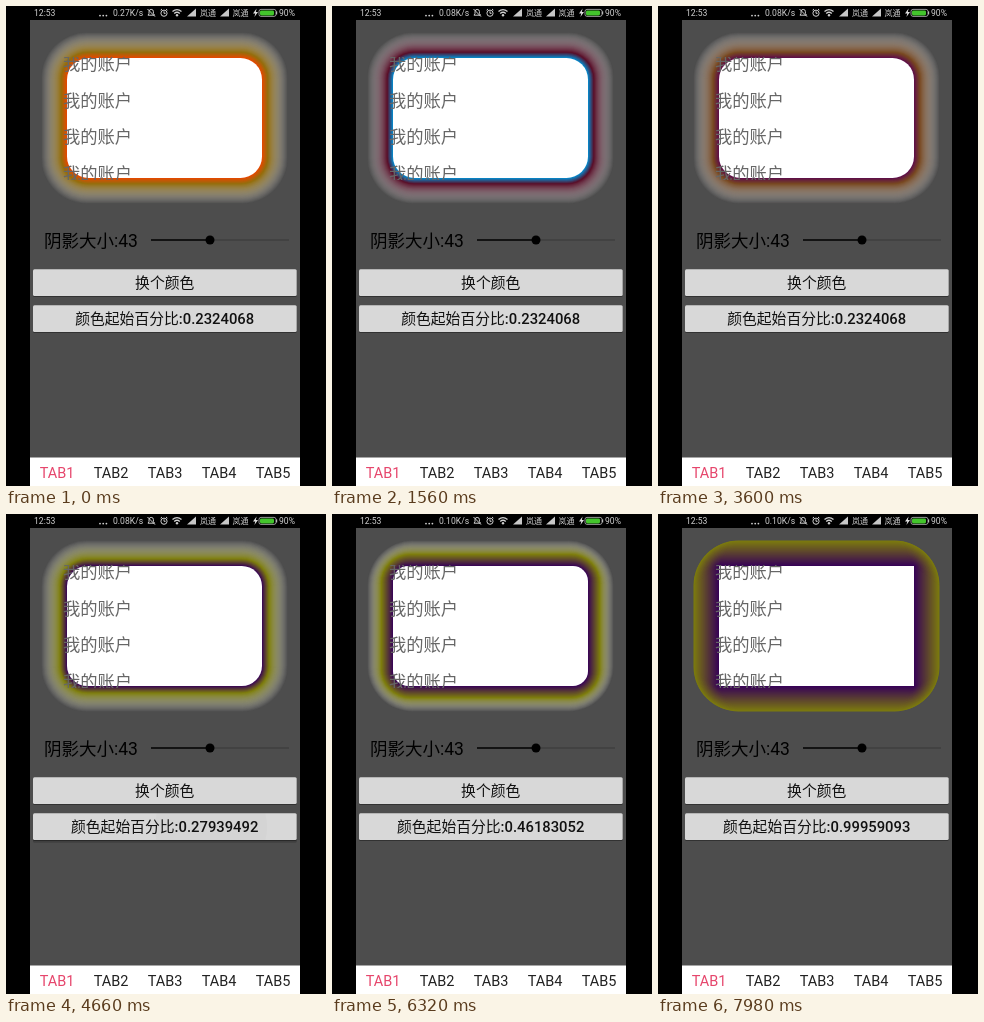
Write an HTML page that moves like this. It is 320 px wide and 480 px high and loops after 8000 ms.

```html
<!DOCTYPE html>
<html lang="zh-CN">
<head>
<meta charset="utf-8">
<style>
html, body { margin: 0; width: 100%; height: 100%; overflow: hidden; background: #000; }
svg { display: block; width: 320px; height: 480px; }
text { font-family: Roboto, "Noto Sans CJK SC", "Noto Sans CJK", sans-serif; }
.status text { font-size: 8.6px; fill: #d0d0d0; }
.list text { font-size: 17.3px; fill: #666; }
.btn text { font-size: 14.8px; text-anchor: middle; fill: #111; }
.num { font-weight: 500; }
.tabs text { font-size: 14.5px; text-anchor: middle; fill: #222; }
.tabs text:first-of-type { fill: #e6466c; }
</style>
</head>
<body>
<svg viewBox="0 0 320 480">
  <defs>
    <clipPath id="listClip"><rect x="50" y="51" width="210" height="123"/></clipPath>
    <clipPath id="clip0"><rect x="27" y="263.3" width="263.7" height="26.7" rx="1.5"/></clipPath>
    <clipPath id="clip1"><rect x="27" y="299.3" width="263.7" height="26.7" rx="1.5"/></clipPath>
    <path id="signal" d="M0 10.5L9 2.5V10.5Z" fill="#c8c8c8"/>
  </defs>
  <rect width="320" height="480"/>
  <rect x="24" y="14" width="270" height="438" fill="#4d4d4d"/>

  <g class="status">
    <text x="28" y="10">12:53</text>
    <g fill="#d0d0d0"><circle cx="94" cy="9.6" r=".9"/><circle cx="97.2" cy="9.6" r=".9"/><circle cx="100.4" cy="9.6" r=".9"/></g>
    <text id="speed" x="107" y="10"></text>
    <g fill="none" stroke="#d0d0d0">
      <path d="M142 9.2H148.5L147.4 7.5V5.6A2.2 2.2 0 0 0 143 5.6V7.5ZM141.5 3L149 10.6"/>
      <circle cx="158" cy="7.2" r="3.1"/><path d="M158 5.3V7.3H159.6M154.6 4.2L156 3M161.4 4.2L160 3"/>
      <path d="M166.5 5.6Q171 1.6 175.5 5.6M168.2 7.5Q171 5 173.8 7.5" stroke-width="1.3"/>
    </g>
    <circle cx="171" cy="9.2" r="1.2" fill="#d0d0d0"/>
    <use href="#signal" x="181"/>
    <text x="194" y="10" style="font-size:8px">岚通</text>
    <use href="#signal" x="214"/>
    <text x="226.5" y="10" style="font-size:8px">岚通</text>
    <path d="M250.6 2.5L247 7.6H249.3L248.4 11L252 6H249.8Z" fill="#e0e0e0"/>
    <rect x="253" y="3.4" width="17" height="7" rx="2" stroke="#bbb" stroke-width=".8"/>
    <rect x="254" y="4.4" width="14" height="5" rx="1.4" fill="#43c52c"/>
    <rect x="270" y="5.4" width="1.2" height="3" fill="#bbb"/>
    <text x="273" y="10">90%</text>
  </g>

  <g id="glow"></g>
  <rect id="card" x="61" y="52" width="195" height="120" fill="#fff"/>
  <g class="list" clip-path="url(#listClip)">
    <text x="57" y="64">我的账户</text><text x="57" y="100.5">我的账户</text>
    <text x="57" y="137">我的账户</text><text x="57" y="173.5">我的账户</text>
  </g>

  <text x="38" y="240.5" font-size="17.5">阴影大小:43</text>
  <path d="M204 234H283" stroke="#383838" stroke-width="1.2"/>
  <path d="M145 234H204" stroke="#000" stroke-width="1.5"/>
  <circle cx="204" cy="234" r="4.5"/>

  <g id="buttons"></g>

  <g class="tabs">
    <rect x="24" y="451.5" width="270" height="28.5" fill="#fff"/>
    <text x="51" y="472">TAB1</text><text x="105" y="472">TAB2</text><text x="159" y="472">TAB3</text>
    <text x="213" y="472">TAB4</text><text x="267" y="472">TAB5</text>
  </g>
</svg>
<script>
const LOOP = 8000, SPREAD = 26, STEPS = 52, HOLD = 80, FADE = 480;
const BACK = [77, 77, 77], WHITE = [255, 255, 255];

// press time, inner colour, middle colour
const colors = [
  [-500, [235, 70, 0], [148, 110, 12]],
  [20, [118, 105, 108], [116, 60, 24]],
  [920, [0, 146, 216], [90, 14, 40]],
  [1560, [62, 80, 136], [102, 17, 44]],
  [2180, [124, 20, 58], [116, 22, 52]],
  [2900, [92, 10, 76], [120, 72, 32]],
  [3620, [54, 0, 88], [126, 126, 12]]
];
// press time, start share as printed
const shares = [
  [-500, "0.2324068"], [4580, "0.27939492"], [5220, "0.042865574"], [5700, "0.46183052"],
  [6320, "0.5217364"], [6960, "0.879266"], [7480, "0.99959093"]
];

const $ = id => document.getElementById(id);
function add(parent, tag, attrs) {
  const el = document.createElementNS("http://www.w3.org/2000/svg", tag);
  set(el, attrs);
  parent.appendChild(el);
  return el;
}
function set(el, attrs) {
  for (const k in attrs) el.setAttribute(k, attrs[k]);
}
const lerp = (a, b, u) => a + (b - a) * u;
const mix = (a, b, u) => a.map((v, i) => lerp(v, b[i], u));
const clamp = v => Math.max(0, Math.min(1, v));
const lastAt = (list, t) => list.filter(e => e[0] <= t).pop();

const rings = [];
for (let i = STEPS; i >= 0; i--) {
  const d = SPREAD * i / STEPS;
  const el = add($("glow"), "rect", { x: 61 - d, y: 52 - d, width: 195 + 2 * d, height: 120 + 2 * d });
  rings.push({ el, u: i / STEPS });
}

function makeButton(i, y) {
  const g = add($("buttons"), "g", { class: "btn" });
  const box = { x: 27, width: 263.7, height: 26.7, rx: 1.5 };
  const lift = add(g, "rect", { ...box, y: y + 3, fill: "#000" });
  add(g, "rect", { ...box, y: y + 1.2, fill: "#000", opacity: .35 });
  add(g, "rect", { ...box, y: y + .3, fill: "#d8d8d8" });
  const wave = add(g, "circle", { cx: 205, cy: y + 14, fill: "#000", "clip-path": `url(#clip${i})` });
  const label = add(g, "text", { x: 158.7, y: y + 19.2 });
  return { lift, wave, label };
}
const buttons = [makeButton(0, 263), makeButton(1, 299)];
buttons[0].label.textContent = "换个颜色";
buttons[1].label.textContent = "颜色起始百分比";
const num = add(buttons[1].label, "tspan", { class: "num" });

function press(button, age) {
  const grow = 1 - (1 - clamp((age - 40) / 300)) ** 2;
  const fade = 1 - clamp((age - 220) / (FADE - 220));
  set(button.wave, { r: lerp(12, 185, grow), opacity: .11 * fade * clamp((age - 60) / 120) });
  set(button.lift, { opacity: .22 * fade * clamp(age / 100) });
}

// the middle colour fades to transparent white over the backdrop
const fadeOut = (mid, v) => mix(BACK, mix(mid, WHITE, v), 1 - v);

let shown = "";
function paintGlow(inner, mid, text) {
  const key = inner + text;
  if (key === shown) return;
  shown = key;
  const p = +text, r = 28 * (1 - p);
  for (const { el, u } of rings) {
    const c = u < p ? mix(inner, mid, u / p) : fadeOut(mid, (u - p) / (1 - p));
    set(el, { rx: lerp(r, 46, u), fill: `rgb(${c.map(Math.round)})` });
  }
  set($("card"), { rx: r });
  num.textContent = ":" + text;
}

function draw(t) {
  const [, inner, mid] = lastAt(colors, t - HOLD);
  paintGlow(inner, mid, lastAt(shares, t - HOLD)[1]);
  press(buttons[0], t - lastAt(colors, t)[0]);
  press(buttons[1], t - lastAt(shares, t)[0]);
  $("speed").textContent = (t < 240 ? "0.27" : t < 4800 ? "0.08" : "0.10") + "K/s";
}

const start = performance.now();
function tick() {
  draw((performance.now() - start) % LOOP);
  requestAnimationFrame(tick);
}
tick();
</script>
</body>
</html>
```
